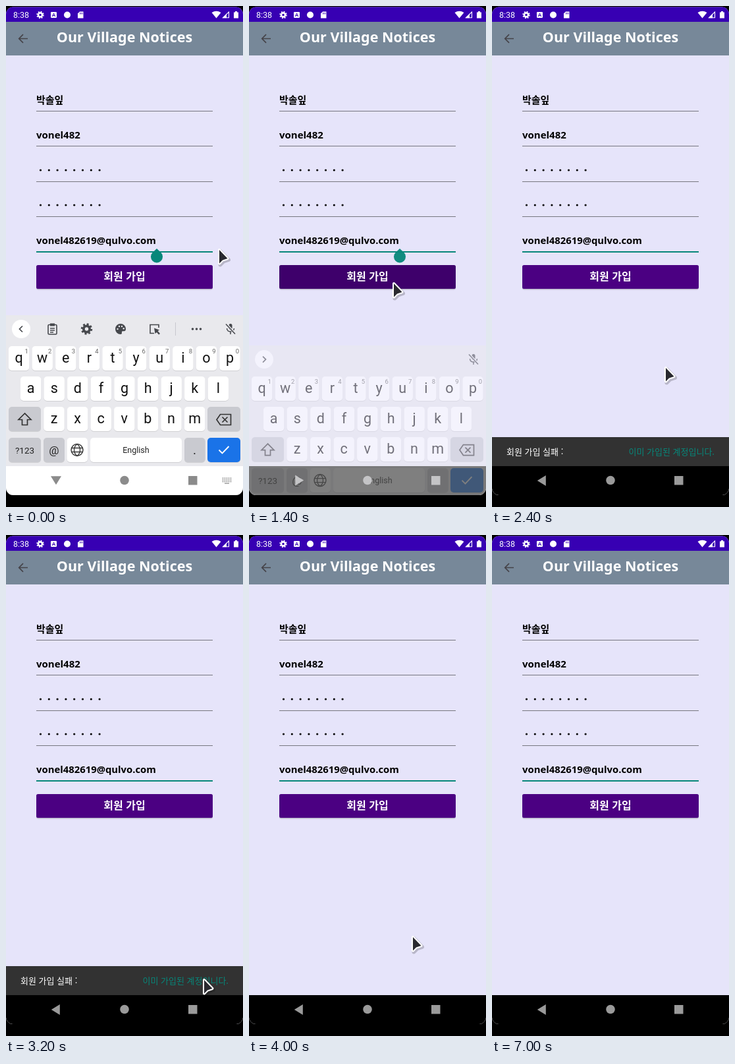
Animation, 360 px wide and 760 px high, one loop 7.1 s. Source, as an HTML page:

```html
<!DOCTYPE html>
<html lang="ko">
<head>
<meta charset="utf-8">
<title>Sign up</title>
<style>
html, body { margin: 0; width: 100%; height: 100%; overflow: hidden; background: #000; }
svg { display: block; }
.b { font-family: "Noto Sans", "Noto Sans CJK KR", "Noto Sans CJK", sans-serif; font-weight: 700; }
.k { font-family: "Noto Sans CJK KR", "Noto Sans CJK", sans-serif; font-weight: 900; }
.n { font-family: "Noto Sans CJK KR", "Noto Sans CJK", sans-serif; }
.r { font-family: Roboto, sans-serif; }
.m { text-anchor: middle; }
</style>
</head>
<body>
<svg id="stage" width="360" height="760" viewBox="0 0 360 760"></svg>
<script>
const LOOP = 7100, TEAL = '#07877a', GREY = '#c9cad0', INK = '#46484d';

const rect = (x, y, w, h, fill, more = '') =>
  `<rect x="${x}" y="${y}" width="${w}" height="${h}" fill="${fill}" ${more}/>`;
const circle = (x, y, r, fill, more = '') =>
  `<circle cx="${x}" cy="${y}" r="${r}" fill="${fill}" ${more}/>`;
const shape = (d, fill, more = '') => `<path d="${d}" fill="${fill}" ${more}/>`;
const line = (d, color, w = 1.6) =>
  `<path d="${d}" fill="none" stroke="${color}" stroke-width="${w}"/>`;
const text = (s, x, y, size, fill, cls) =>
  `<text x="${x}" y="${y}" font-size="${size}" fill="${fill}" class="${cls}">${s}</text>`;

function gear(x, y, r, color) {
  const tooth = Math.PI * r / 8;
  return circle(x, y, r, 'none', `stroke="${color}" stroke-width="${r * .5}" stroke-dasharray="${tooth}"`) +
    circle(x, y, r * .66, 'none', `stroke="${color}" stroke-width="${r * .55}"`);
}

function statusBar() {
  return rect(0, 0, 360, 24, '#3700b3') +
    text('8:38', 11, 18, 12.5, '#fff', 'r') + gear(52, 13.5, 4.6, '#fff') +
    rect(68, 9, 9, 9, '#fff', 'rx="1.2"') + line('M70.3 16 72.5 11 74.7 16M71 14.5H74', '#3700b3', 1) +
    circle(93, 13.5, 5, '#fff') +
    shape('M112 8.5H117.5V18.5H109V11.5Z', '#fff') + line('M112.5 10V12.5M114.2 10V12.5M116 10V12.5', '#3700b3', .8) +
    shape('M312.5 10Q319.5 5.5 326.5 10L319.5 18.5Z', '#fff') +
    line('M329.5 17.8H338.5V9Z', '#fff', 1.1) + shape('M329 18.3 335 12V18.3Z', '#fff') +
    shape('M346 9.5H348V8H351V9.5H353V18.5H346Z', '#fff');
}

function form() {
  let s = rect(0, 24, 360, 51, '#778899') +
    line('M33 49.5H20M26 43.2 19.7 49.5 26 55.8', '#454349', 1.7) +
    text('Our Village Notices', 180, 55, 21.5, '#fff', 'b m');
  for (const y of [159, 212, 266, 319]) s += rect(46, y, 268, 1, '#77777f');
  s += text('박솔잎', 46, 148, 15, '#000', 'k') +
    text('vonel482', 46, 201, 15, '#000', 'b') +
    text('vonel482619@qulvo.com', 46, 361, 14.85, '#000', 'b') +
    rect(46, 372, 268, 2, TEAL);
  for (const y of [249, 302])
    for (let i = 0; i < 8; i++) s += circle(52.5 + i * 12.8, y, 1.6, '#000');
  return s + rect(46, 394, 268, 36.5, '#00000030', 'rx="3"') +
    rect(46, 393, 268, 36, '#4b0082', 'rx="2.5" id="button"') +
    text('회원 가입', 180, 415.5, 16, '#fff', 'k m') +
    rect(228, 346, 2, 22, TEAL, 'id="caret"') +
    shape('M229 368L235.4 374.1A9 9 0 1 1 222.6 374.1Z', TEAL, 'id="handle"');
}

function key(x, y, w, fill = '#fff') {
  return rect(x, y + 1, w, 37, '#0000001c', 'rx="5"') + rect(x, y, w, 37, fill, 'rx="5"');
}

function letters(row, x, y, hints) {
  return [...row].map((c, i) => {
    const cx = x + i * 35.6;
    return key(cx - 15.7, y, 31.4) + text(c, cx, y + 25, 21.5, '#111', 'r m') +
      (hints ? text((i + 1) % 10, cx + 11.5, y + 10.5, 9.5, '#666', 'r m') : '');
  }).join('');
}

function toolIcons() {
  return rect(64, 483.5, 13, 14.5, 'none', `rx="1.5" stroke="${INK}" stroke-width="1.6"`) +
    rect(67, 481.5, 7, 4, INK) + line('M67 489H74M67 492H74M67 495H72', INK, 1.3) +
    gear(122.5, 490, 7, INK) +
    shape('M174 482A8 8 0 1 0 174 498C177 498 175.5 495 176 494C177 492 182 495 182 490A8 8 0 0 0 174 482Z', INK) +
    [[169.5, 490], [172, 486], [176, 486], [178.7, 489.3]].map(p => circle(...p, 1.2, '#e9e9ed')).join('') +
    line('M232 488V483.5H219V496.5H225', INK) + shape('M225 488.5 233 491.5 230.5 493 234 497 232 498.5 229 495 226.5 497Z', INK) +
    rect(257, 480, 1, 20, '#c8c8ce') +
    [283.5, 289.5, 295.5].map(x => circle(x, 490, 1.8, INK)).join('');
}

function keyboard() {
  return rect(0, 469, 360, 229, '#e9e9ed') +
    circle(23, 490, 14, '#fff') + `<path id="chevron" fill="none" stroke="${INK}" stroke-width="1.7"/>` +
    `<g id="tools">${toolIcons()}</g>` +
    rect(338.5, 482, 5, 9, INK, 'rx="2.5"') + line('M335.5 489Q336 494 341 494T346.5 489M341 494V498', INK, 1.5) +
    line('M334 482 348 497', '#e9e9ed', 3.5) + line('M334 482.5 348 497.5', INK, 1.5) +
    letters('qwertyuiop', 19.6, 516, true) + letters('asdfghjkl', 37.6, 562) + letters('zxcvbnm', 73, 608) +
    key(4, 608, 49, GREY) + line('M28.5 618 19 627.5H24.5V635.5H32.5V627.5H38Z', '#333', 1.7) +
    key(306, 608, 50, GREY) + line('M325.5 619.5H341.5V635.5H325.5L320 627.5ZM328.5 623.5 336.5 631.5M336.5 623.5 328.5 631.5', '#333', 1.7) +
    key(4, 655, 49, GREY) + text('?123', 28.5, 678.5, 13.5, '#222', 'r m') +
    key(57, 655, 32, GREY) + text('@', 73, 679.5, 17, '#222', 'r m') +
    key(92.5, 655, 31.5) + circle(108, 673.5, 9, 'none', 'stroke="#333" stroke-width="1.4"') +
    line('M108 664.5C102 669 102 678 108 682.5C114 678 114 669 108 664.5M100 670.5H116M100 676.5H116', '#333', 1.3) +
    key(128, 655, 139) + text('English', 197.5, 678, 12.5, '#222', 'r m') +
    key(271, 655, 31.5, GREY) + text('.', 286.5, 680, 19, '#222', 'r m') +
    key(306, 655, 50, '#1a73e8') + line('M323.5 673.5 328.5 678.5 338.5 668', '#fff', 1.9);
}

function switcher() {
  let s = '';
  for (let i = 0; i < 15; i++) s += rect(328.5 + i % 5 * 3, 715.5 + Math.floor(i / 5) * 2.6, 1.9, 1.6, '#999');
  return `<g id="switcher">${s}${rect(332, 723.5, 7, 1.4, '#999')}</g>`;
}

document.getElementById('stage').innerHTML =
  `<defs><clipPath id="screen"><rect y="1.5" width="360" height="740.5" rx="11"/></clipPath></defs>` +
  rect(0, 0, 360, 760, '#000') +
  `<g clip-path="url(#screen)">` +
  rect(0, 0, 360, 760, '#e6e4fa') + statusBar() + form() +
  `<g id="snack">${rect(0, 654, 360, 44, '#323232')}<g id="message">` +
  text('회원 가입 실패 :', 22, 681, 13, '#fff', 'n') +
  `<g text-anchor="end">${text('이미 가입된 계정입니다.', 338, 681, 13, TEAL, 'n')}</g></g></g>` +
  rect(0, 698, 360, 62, '#fff') +
  `<g id="keys">${keyboard()}</g>` + rect(0, 698, 360, 62, '#000', 'id="dark"') +
  `<g id="nav">${shape('M-8 -5.8H8L0 7.2Z', 'inherit', 'id="back"')}<circle cx="180" cy="719.5" r="6.8"/>` +
  `<rect x="277" y="713" width="13.5" height="13.5"/></g>` + switcher() +
  `</g><g id="cursor" stroke-linejoin="round">` +
  shape('M0 0V20.5L5 15.5 12.5 13Z', 'none', 'transform="translate(1.5 2)" stroke="#0003" stroke-width="6"') +
  shape('M0 0V20.5L5 15.5 12.5 13Z', '#29292f', 'stroke="#fff" stroke-width="4" paint-order="stroke"') + '</g>';

const el = {};
document.querySelectorAll('[id]').forEach(e => el[e.id] = e);
const set = (id, name, v) => el[id].setAttribute(name, v);
const clamp = v => Math.max(0, Math.min(1, v));
const ease = v => v * v * (3 - 2 * v);

// time, x, y
const path = [
  [300, 324, 370], [400, 328, 372], [600, 318, 385], [800, 280, 407], [1100, 220, 421],
  [1900, 220, 421], [2100, 230, 445], [2400, 264, 549], [2500, 300, 610], [2700, 308, 663],
  [2900, 244, 673], [3000, 222, 674], [3200, 301, 675], [3300, 301, 675], [3800, 249, 610],
  [4100, 249, 610], [4300, 264, 600], [4500, 210, 575], [4700, 105, 540], [4900, -6, 505]
];

function pointer(t) {
  const i = path.findIndex(p => p[0] >= t);
  if (i < 0) return path[path.length - 1].slice(1);
  if (!i) return path[0].slice(1);
  const [a, b] = [path[i - 1], path[i]], u = (t - a[0]) / (b[0] - a[0]);
  return [a[1] + (b[1] - a[1]) * u, a[2] + (b[2] - a[2]) * u];
}

function draw(t) {
  const hide = clamp((t - 1300) / 300), dark = clamp(hide * 1.5);
  set('keys', 'transform', `translate(0 ${229 * hide ** 1.46})`);
  set('keys', 'opacity', clamp(1 - 1.35 * hide));
  set('tools', 'opacity', hide ? 0 : 1);
  set('chevron', 'd', hide ? 'M21 485.5 25.5 490 21 494.5' : 'M25 485.5 20.5 490 25 494.5');
  set('dark', 'opacity', dark);
  set('nav', 'fill', dark === 0 ? '#8b8b8b' : dark < 1 ? '#c4c4c6' : '#9a9a9a');
  set('back', 'fill', el.nav.getAttribute('fill'));
  set('back', 'transform', `translate(76 ${719 + dark}) rotate(${-270 * ease(hide) - (hide > 0 && hide < 1 ? 20 : 0)})`);
  set('switcher', 'opacity', hide ? 0 : 1);

  set('button', 'fill', t >= 1200 && t < 1600 ? '#3e006b' : '#4b0082');
  set('handle', 'opacity', t < 1400 ? 1 : clamp((1600 - t) / 210));
  set('caret', 'opacity', Math.floor(t / 500) % 2);

  const out = 1 - ease(clamp((t - 1600) / 200)) + ease(clamp((t - 3300) / 300));
  set('snack', 'transform', `translate(0 ${44 * out})`);
  set('message', 'opacity', 1 - clamp(out));

  const [x, y] = pointer(t);
  set('cursor', 'transform', `translate(${x} ${y})`);
  set('cursor', 'opacity', t < 5000 ? 1 : 0);
}

const start = performance.now();
function tick() {
  const t = (performance.now() - start) % LOOP;
  draw(Math.floor(t / 100) * 100);
  requestAnimationFrame(tick);
}
tick();
</script>
</body>
</html>
```
